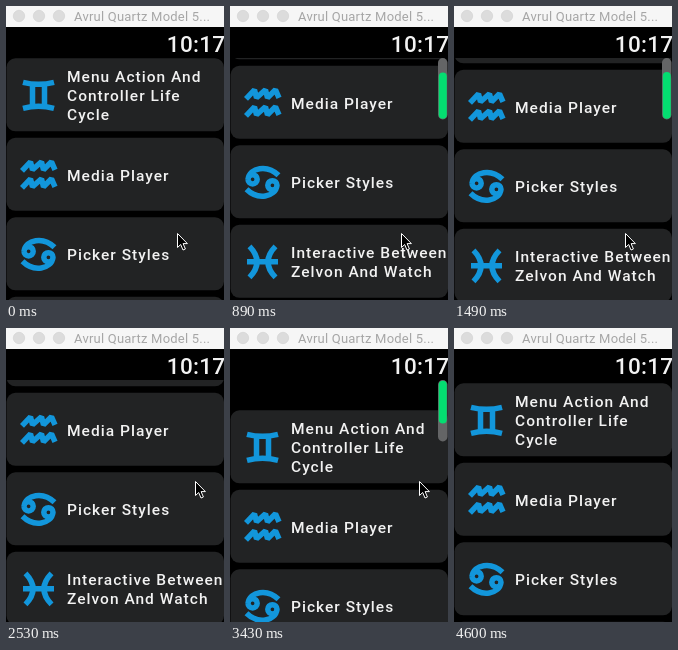
Recreate the animation shown at these times as an HTML page. Size 218x294 px, loop 4.96 s.

```html
<!DOCTYPE html>
<html lang="en">
<head>
<meta charset="utf-8">
<title>Watch menu</title>
<style>
  html, body { margin: 0; width: 100%; height: 100%; overflow: hidden; background: #000; }
  svg { display: block; width: 218px; height: 294px; }
  text { font-family: Roboto, Arial, sans-serif; fill: #f2f2f2; white-space: pre; }
  .label { font-size: 15.5px; font-weight: 500; letter-spacing: 1.02px; }
  .icon { fill: none; stroke: #1296db; stroke-width: 5.5; stroke-linejoin: bevel; }
</style>
</head>
<body>
<svg viewBox="0 0 218 294">
  <clipPath id="view"><rect y="52" width="218" height="242"/></clipPath>
  <rect width="218" height="294"/>
  <g clip-path="url(#view)"><g id="list"></g></g>
  <g id="bar">
    <rect x="208" y="52" width="9.5" height="61.5" rx="4.7" fill="#646566"/>
    <rect id="thumb" x="208.8" width="8" rx="4" fill="#04de71"/>
  </g>
  <text x="160.8" y="45.5" font-size="22.5" font-weight="500" letter-spacing=".3">10:17</text>
  <rect width="218" height="21" fill="#f6f6f6"/>
  <g fill="#dcdcdc" stroke="#d0d0d0" stroke-width=".6">
    <circle cx="13" cy="10" r="5.7"/><circle cx="33" cy="10" r="5.7"/><circle cx="53" cy="10" r="5.7"/>
  </g>
  <text x="68" y="15" font-size="13" letter-spacing=".22" style="fill:#a6a6a6">Avrul Quartz Model 5...</text>
  <path id="cursor" d="M.5 .5V14.5L3.7 11.5L6 17L8.4 16L6.1 10.6H10.4Z" fill="#000" stroke="#fff"/>
</svg>
<script>
const PERIOD = 4960, TICK = 148.3, PITCH = 79.5, MAX = 67;
const $ = id => document.getElementById(id);

const wave = y => `M-16.5 ${y + 9}L-8 ${y}L-6 ${y + 8}L3 ${y}L5 ${y + 8}L13 ${y}L16.5 ${y + 8}`;
const claw = s => `M${-14.5 * s} ${-3 * s}a4.6 4.6 0 1 0 ${9.2 * s} 0a4.6 4.6 0 1 0 ${-9.2 * s} 0`
  + `C${-13 * s} ${-15 * s} ${5 * s} ${-18 * s} ${16 * s} ${-7 * s}`;
const items = [
  [['Menu Action And', 'Controller Life', 'Cycle'],
    'M-15.5-13Q0-9 15.5-13M-15.5 13Q0 9 15.5 13M-6-10V10M6-10V10'],
  [['Media Player'], wave(-13) + wave(4)],
  [['Picker Styles'], claw(1) + claw(-1)],
  [['Interactive Between', 'Zelvon And Watch'],
    'M-13-15.5Q2 0-13 15.5M13-15.5Q-2 0 13 15.5M-15.5 0H15.5'],
];

$('list').innerHTML = items.map(([lines, icon], i) => `
  <g transform="translate(0 ${52.3 + i * PITCH})">
    <rect x=".5" width="217.5" height="73" rx="9" fill="#222324"/>
    <path class="icon" transform="translate(32.5 37)" d="${icon}"/>
    ${lines.map((line, n) => `<text class="label" x="61"
      y="${43.2 + 19 * (n - (lines.length - 1) / 2)}">${line}</text>`).join('')}
  </g>`).join('');

const clamp = x => Math.min(1, Math.max(0, x));
const mix = (a, b, u) => a + (b - a) * u;
const ease = u => u * u * (3 - 2 * u);

// A swipe eases out past the edge, then springs back to rest.
function swipe(k, start, peakAt, from, peak, rest, rate) {
  return k < peakAt
    ? mix(from, peak, ease(clamp((k - start) / (peakAt - start))))
    : mix(rest, peak, Math.exp(-rate * (k - peakAt)));
}

const fade = (k, on, off) => k < on ? 0 : clamp((off - k) / 2);

function draw() {
  // Poses are held for one tick each.
  const k = Math.floor((performance.now() - start) % PERIOD / TICK);

  const scroll = Math.round(k < 19
    ? swipe(k, 1, 4, 0, 80, MAX, .53)
    : swipe(k, 19, 23, MAX, -30, -3, 1.1));
  $('list').setAttribute('transform', `translate(0 ${-scroll})`);

  const inside = MAX * clamp(scroll / MAX);
  const size = 47 - .14 * Math.abs(scroll - inside);
  $('thumb').setAttribute('height', size);
  $('thumb').setAttribute('y', 52.8 + (60 - size) * inside / MAX);
  $('bar').setAttribute('opacity', fade(k, 2, 14) + fade(k, 20, 30));

  const rise = ease(clamp((k - 13) / 4)), leave = clamp((k - 28) / 3);
  const x = 171 + 18 * rise + 17 * leave, y = 227 - 74 * rise + 163 * leave;
  $('cursor').setAttribute('transform', `translate(${x} ${y})`);

  requestAnimationFrame(draw);
}
const start = performance.now();
draw();
</script>
</body>
</html>
```
